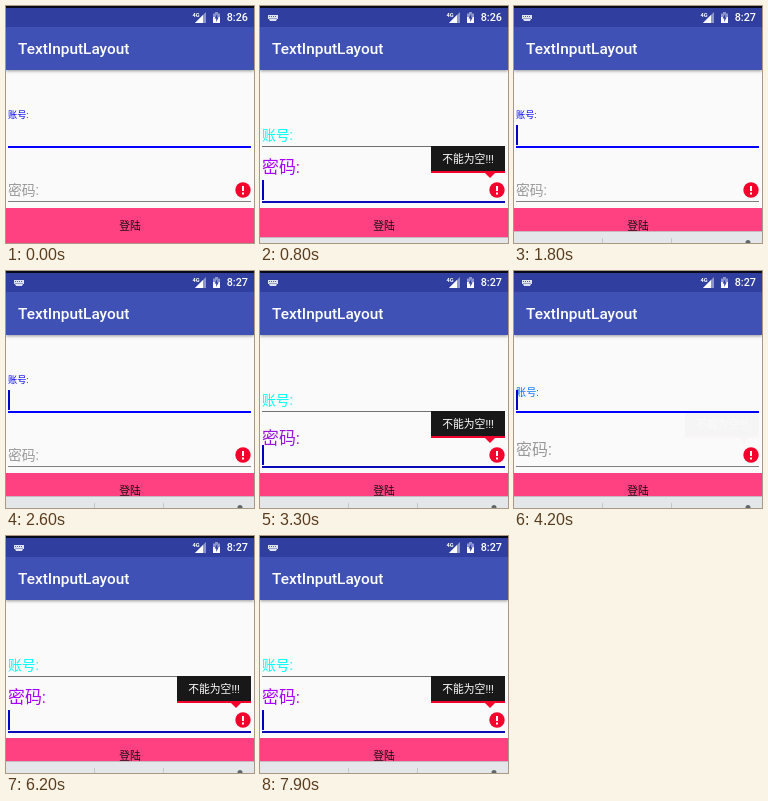
An HTML page that plays this animation: 248 px wide and 237 px high, repeating every 8000 ms.

```html
<!DOCTYPE html>
<html lang="zh-CN">
<head>
<meta charset="utf-8">
<title>TextInputLayout</title>
<style>
html, body { margin: 0; width: 100%; height: 100%; overflow: hidden; }
body { background: #fafafa; font-family: Roboto, "Noto Sans CJK SC", "Noto Sans CJK", sans-serif; }
#stage { position: relative; width: 248px; height: 237px; overflow: hidden; background: #fafafa; }
#stage > *, #popup * { position: absolute; }
#stage * { box-sizing: border-box; white-space: nowrap; }

.bar { left: 0; width: 248px; }
#status { top: 0; height: 21px; background: #303f9f; border-top: 2px solid #080b1c; }
#tools { top: 21px; height: 43px; background: #3f51b5; box-shadow: 0 1px 3px rgba(0,0,0,.4); }
#title { left: 12px; top: 33px; font: 500 15.4px/20px Roboto, sans-serif; color: #fff; }
.clock { right: 6px; top: 2px; font: 500 10.8px/20px Roboto, sans-serif; color: #fff; }
#icons { left: 0; top: 0; }

.label { left: 2px; top: -10px; line-height: 20px; }
.line { left: 2px; width: 243px; height: 2px; }
.caret { left: 2px; width: 2px; height: 20px; background: #0000c8; }
#userLine { top: 140px; }
#passLine { top: 195px; }
#userCaret { top: 119px; }
#passCaret { top: 174px; }
#button { top: 202px; height: 35px; background: #ff4081; color: #111;
  font-size: 10.8px; font-weight: 500; line-height: 37px; text-align: center; }
#popup { left: 171px; top: 140px; width: 74px; height: 33px; }
#popup p { margin: 0; width: 74px; height: 27px; background: #181818; border-bottom: 2px solid #f5002d;
  color: #fff; font-size: 10.8px; line-height: 27px; text-align: center; }
#popup i { left: 54px; top: 27px; border: 5px solid transparent; border-top-color: #f5002d; border-bottom: 0; }
#error { left: 229px; top: 176px; }
#keys { left: 0; top: 225px; }

/* One loop, held in 100 ms steps */
.anim { animation: 8s step-end infinite; }
#userLabel { animation-name: user-label; }
#passLabel { animation-name: pass-label; }
#userLine { animation-name: user-line; }
#passLine { animation-name: pass-line; }
#userCaret { animation-name: user-caret; }
#passCaret { animation-name: pass-caret; }
#popup { animation-name: popup; }
#keys { animation-name: keys; }
#kbIcon { animation-name: kb-icon; }
#before { animation-name: before; }
#after { animation-name: after; }

@keyframes user-label {
  0%, 22.5%, 53.75%, 100% { transform: translateY(108.5px); font-size: 9.2px; color: #00f; }
  6.25%, 40%, 75% { transform: translateY(120px); font-size: 11.5px; color: #0080ff; }
  7.5%, 41.25%, 76.25% { transform: translateY(128.5px); font-size: 13.8px; color: #0ff; }
  21.25%, 52.5% { transform: translateY(122px); font-size: 10.2px; color: #0070ff; }
}
@keyframes pass-label {
  0%, 22.5%, 53.75% { transform: translateY(183.5px); font-size: 13.8px; color: #999; }
  6.25%, 40%, 75% { transform: translateY(178px); font-size: 15.2px; color: #9650b4; }
  7.5%, 41.25%, 76.25% { transform: translateY(167px); font-size: 16.9px; color: #9a14dc; }
  8.75%, 42.5%, 77.5%, 100% { transform: translateY(160.5px); font-size: 16.9px; color: #a0f; }
  20%, 51.25% { transform: translateY(168px); font-size: 16.6px; color: #a030d8; }
  21.25%, 52.5% { transform: translateY(179px); font-size: 16px; color: #999; }
}
@keyframes user-line {
  0%, 20%, 51.25% { height: 2px; background: #00f; }
  6.25%, 40%, 75%, 100% { height: 1px; background: #707070; }
}
@keyframes pass-line {
  0%, 20%, 51.25% { height: 1px; background: #808080; }
  6.25%, 40%, 75%, 100% { height: 2px; background: #0a0ab8; }
}
@keyframes user-caret {
  0%, 27.5%, 38.75%, 57.5%, 68.75%, 100% { opacity: 0; }
  21.25%, 32.5%, 51.25%, 62.5% { opacity: 1; }
}
@keyframes pass-caret {
  0%, 13.75%, 45%, 51.25%, 81.25%, 92.5% { opacity: 0; }
  7.5%, 40%, 50%, 76.25%, 87.5%, 98.75%, 100% { opacity: 1; }
}
@keyframes popup {
  0%, 22.5%, 53.75% { opacity: 0; }
  6.25%, 20%, 40%, 51.25%, 75% { opacity: .5; }
  7.5%, 41.25%, 76.25%, 100% { opacity: 1; }
  21.25%, 52.5% { opacity: .02; }
}
@keyframes keys {
  0% { transform: translateY(12px); }
  10% { transform: translateY(6px); }
  11.25%, 100% { transform: none; }
}
@keyframes kb-icon { 0% { opacity: 0; } 10%, 100% { opacity: 1; } }
@keyframes before { 0% { opacity: 1; } 18.75%, 100% { opacity: 0; } }
@keyframes after { 0% { opacity: 0; } 18.75%, 100% { opacity: 1; } }
</style>
</head>
<body>
<div id="stage">
  <div id="tools" class="bar"></div>
  <div id="status" class="bar"></div>
  <svg id="icons" width="248" height="21">
    <g id="kbIcon" class="anim">
      <path d="M8 9h10v4h-1l-1 2h-6l-1-2h-1z" fill="#dfe2f2"/>
      <path d="M9 10.5h8M9.5 12.5h7" stroke="#303f9f" stroke-width=".8" stroke-dasharray="1 1"/>
    </g>
    <path d="M200 6v11h-11z" fill="#8d96cc"/>
    <path d="M197 9v8h-8z" fill="#fff"/>
    <text x="186.5" y="11" font-size="5.6" font-weight="700" fill="#fff">4G</text>
    <path d="M207 7.5h2v-1.500h3v1.500h2v4h-7z" fill="#8d96cc"/>
    <path d="M207 11h7v6h-7z" fill="#fff"/>
    <path d="M211.200 8l-2.700 4.500h1.700v3.500l2.500-4.700h-1.500z" fill="#303f9f"/>
  </svg>
  <div id="before" class="clock anim">8:26</div>
  <div id="after" class="clock anim">8:27</div>
  <div id="title">TextInputLayout</div>

  <div id="userLabel" class="label anim">账号:</div>
  <div id="userLine" class="line anim"></div>
  <div id="userCaret" class="caret anim"></div>

  <div id="passLabel" class="label anim">密码:</div>
  <div id="passLine" class="line anim"></div>
  <div id="passCaret" class="caret anim"></div>

  <svg id="error" width="16" height="16">
    <circle cx="8" cy="8" r="7.700" fill="#f5002d"/>
    <path d="M7 4h2v5H7zM7 10.500h2v2H7z" fill="#fff"/>
  </svg>
  <div id="button" class="bar">登陆</div>
  <div id="popup" class="anim"><p>不能为空!!!</p><i></i></div>

  <svg id="keys" class="anim" width="248" height="12">
    <path d="M0 0h248v12H0z" fill="#e4e7e9"/>
    <path d="M0 .5h248" stroke="#c9b8bf"/>
    <path d="M88.500 7v5M157.500 7v5" stroke="#c3c8cb"/>
    <path d="M231.500 12v-.500a2.500 2.500 0 0 1 5 0v.5z" fill="#5f676b"/>
  </svg>
</div>
</body>
</html>
```
